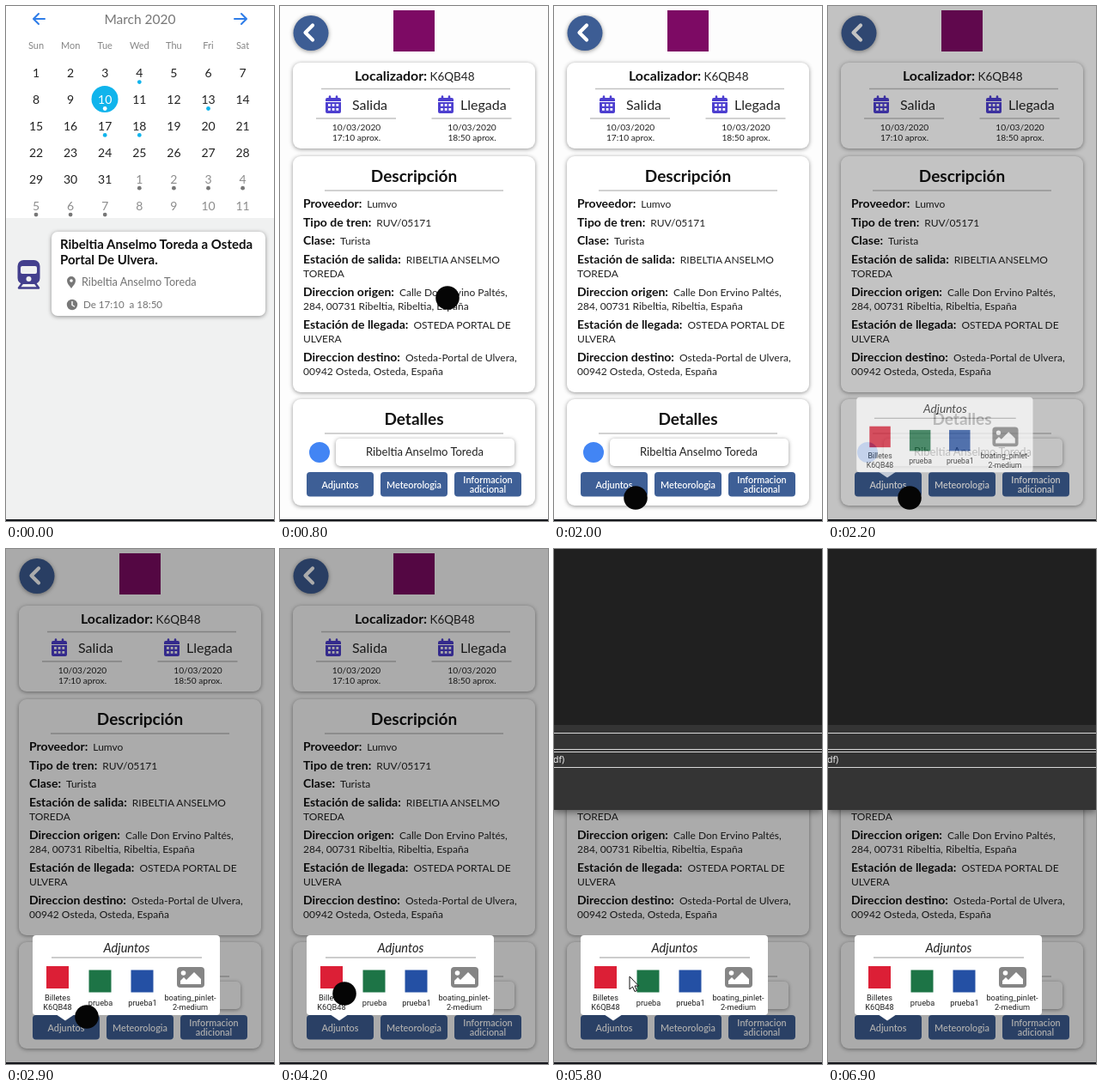
Recreate the animation shown at these times as an HTML page. Size 312 by 600 pixels, loop 7100 ms.

```html
<!DOCTYPE html>
<html lang="es">
<head>
<meta charset="utf-8">
<style>
  html, body { margin: 0; width: 100%; height: 100%; overflow: hidden; background: #fff; }
  svg { display: block; width: 312px; height: 600px; }
  text { font-family: Lato, sans-serif; fill: #222; white-space: pre; }
  .b { font-weight: 700; fill: #111; }
  .m { text-anchor: middle; }
  .small { font-family: Roboto, sans-serif; font-size: 9.2px; text-anchor: middle; }
  .card { fill: #fff; filter: drop-shadow(0 1px 2.5px rgba(0,0,0,.42)); }
  .rule { stroke: #c2c2c2; stroke-width: 1.5; }
  .line { fill: none; stroke-linecap: round; stroke-linejoin: round; }
</style>
</head>
<body>
<svg viewBox="0 0 312 600">
  <g id="agenda"></g>
  <g id="ticket"></g>
  <rect id="shade" width="312" height="600"/>
  <g id="popover"></g>
  <rect y="598" width="312" height="2" fill="#15171c"/>
  <g id="dialog">
    <rect width="312" height="304" fill="#343434" style="filter:drop-shadow(0 2px 4px rgba(0,0,0,.5))"/>
    <rect width="312" height="205" fill="#202020"/>
    <path d="M0 214.5H312M0 233.5H312M0 236.5H312M0 254.5H312" stroke="#d8d8d8"/>
    <text x="-1" y="249" style="font:10.5px 'Open Sans',sans-serif;fill:#fff">df)</text>
  </g>
  <circle id="dot" r="13.8" fill="#050505"/>
  <path id="arrow" d="M0 0V15L3.5 12L6 17.5L8.5 16.5L6 11H10.5Z" fill="#fff" stroke="#111"/>
</svg>
<script>
const $ = id => document.getElementById(id);
const text = (x, y, size, str, cls = '', style = '') =>
  `<text x="${x}" y="${y}" class="${cls}" style="font-size:${size}px;${style}">${str}</text>`;
const rect = (x, y, w, h, r, attrs) =>
  `<rect x="${x}" y="${y}" width="${w}" height="${h}" rx="${r}" ${attrs}/>`;
const circle = (x, y, r, fill) => `<circle cx="${x}" cy="${y}" r="${r}" fill="${fill}"/>`;
const card = (x, y, w, h, r) => rect(x, y, w, h, r, 'class="card"');
const rule = (x1, x2, y) => `<path d="M${x1} ${y}H${x2}" class="rule"/>`;
const line = (d, color, width) =>
  `<path d="${d}" class="line" stroke="${color}" stroke-width="${width}"/>`;

const station = 'Ribeltia Anselmo Toreda';
const code = 'K6QB48';

function agenda() {
  const columnX = i => 35 + 40.1 * i;
  let s = rect(0, 0, 312, 600, 0, 'fill="#f0f1f1"') + rect(0, 0, 312, 247, 0, 'fill="#fff"');
  s += line('M45 15H32.5M38 9L32 15L38 21', '#2f7de8', 2);
  s += line('M266 15H279.5M274 9L280 15L274 21', '#2f7de8', 2);
  s += text(156, 20.5, 15.5, 'March 2020', 'm', 'fill:#777');
  'Sun Mon Tue Wed Thu Fri Sat'.split(' ').forEach((d, i) => {
    s += text(columnX(i), 50, 11, d, 'm', 'fill:#858585');
  });
  s += circle(115, 108.5, 15.5, '#10b4ec');
  const events = [4, 10, 13, 17, 18];
  for (let n = 1; n <= 42; n++) {
    const x = columnX((n - 1) % 7), y = 83.3 + 30.9 * Math.floor((n - 1) / 7);
    const next = n > 31;
    const color = next ? '#8c8c8c' : n == 10 ? '#fff' : '#222';
    s += text(x, y, 14, next ? n - 31 : n, 'm', `fill:${color}`);
    if (events.includes(n) || next && n < 39)
      s += circle(x, y + 5.3, 2.4, next ? '#777' : n == 10 ? '#fff' : '#10b4ec');
  }
  s += card(53, 263, 249, 98, 7);
  s += text(63, 282.5, 15, station + ' a Osteda', 'b') + text(63, 300.5, 15, 'Portal De Ulvera.', 'b');
  s += '<path d="M76 329C73 325 71 323 71 320A5 5 0 0 1 81 320C81 323 79 325 76 329Z" fill="#777"/>' + circle(76, 320, 1.8, '#fff');
  s += text(88, 326, 12.7, station, '', 'fill:#737373');
  s += circle(77, 348, 6.2, '#777') + line('M77 344.5V348.5L79.5 350', '#fff', 1.4);
  s += text(90, 351.5, 11.6, 'De 17:10  a 18:50', '', 'fill:#737373');
  // train
  s += line('M19 323L15 328.5H38L34 323', '#433f8d', 2.5);
  s += rect(13.5, 296, 26, 28, 7, 'fill="#433f8d"') + rect(17, 303, 19, 9, 2, 'fill="#f0f1f1"');
  return s + circle(26.5, 318, 3, '#f0f1f1');
}

function calendarIcon(x) {
  let s = rect(x, 107, 18, 18, 2, 'fill="#4d3fd0"') + line(`M${x + 5} 105.5V109M${x + 13} 105.5V109`, '#4d3fd0', 2.6);
  s += `<path d="M${x} 111.5H${x + 18}" stroke="#fff"/>`;
  for (let i = 0; i < 6; i++)
    s += rect(x + 3 + i % 3 * 4.7, 114 + (i > 2) * 5, 2.8, 2.8, 0, 'fill="#fff"');
  return s;
}

function ticket() {
  let s = rect(0, 0, 312, 600, 0, 'fill="#fdfdfd"');
  s += '<circle cx="36" cy="31.5" r="20.5" class="card" style="fill:#3d5d94"/>' + line('M38 22.5L29.5 31L38 39.5', '#fff', 4.2);
  s += rect(132, 5, 48, 48, 0, 'fill="#7d0a64"');

  s += card(15, 66, 282, 100, 9);
  s += text(87, 86.5, 15.9, 'Localizador:', 'b') + text(174.5, 86.5, 13.5, code);
  s += rule(48, 268, 96.5);
  [[53, 84, 89, 'Salida', '17:10'], [184, 210, 223.5, 'Llegada', '18:50']].forEach(([icon, x, mid, name, time]) => {
    s += calendarIcon(icon) + text(x, 121, 16, name) + rule(mid - 47, mid + 46, 131);
    s += text(mid, 145, 10.2, '10/03/2020', 'm') + text(mid, 157, 10.2, time + ' aprox.', 'm');
  });

  s += card(15, 175, 282, 275, 9);
  s += text(156, 205, 19, 'Descripción', 'b m') + rule(52, 260, 215);
  [
    [235, 'Proveedor', 'Lumvo'],
    [256.5, 'Tipo de tren', 'RUV/05171'],
    [278, 'Clase', 'Turista'],
    [300, 'Estación de salida', 'RIBELTIA ANSELMO', 'TOREDA'],
    [337.5, 'Direccion origen', 'Calle Don Ervino Paltés,', '284, 00731 Ribeltia, Ribeltia, España'],
    [376, 'Estación de llegada', 'OSTEDA PORTAL DE', 'ULVERA'],
    [413.5, 'Direccion destino', 'Osteda-Portal de Ulvera,', '00942 Osteda, Osteda, España'],
  ].forEach(([y, label, value, more]) => {
    s += text(27, y, 12, `<tspan class="b" font-size="14">${label}:</tspan><tspan dx="6">${value}</tspan>`);
    if (more) s += text(27, y + 16.3, 12, more);
  });

  s += card(15, 458, 282, 124, 9);
  s += text(156, 488, 19, 'Detalles', 'b m') + rule(52, 260, 498);
  s += circle(46, 520, 12, '#4285f4');
  s += card(65, 504, 208, 32, 5) + text(168.5, 524, 13, station, 'm');
  [['Adjuntos'], ['Meteorologia'], ['Informacion', 'adicional']].forEach((words, i) => {
    const x = 31 + 86 * i;
    s += rect(x, 543, 78, 28.5, 4, 'fill="#3e5f96"');
    words.forEach((w, j) => {
      s += text(x + 39, (words[1] ? 556 : 561.5) + 10.5 * j, 10.8, w, 'm', 'fill:#fff;font-weight:600');
    });
  });
  return s;
}

function popover() {
  let s = '<path d="M58 542L69 549.5L80 542Z" fill="#fff"/>' + rect(31, 450, 218, 93, 4, 'fill="#fff"');
  s += text(140.5, 469.5, 14.6, 'Adjuntos', 'm', 'font-style:italic');
  s += '<path d="M53 476H228" stroke="#999"/>';
  [[60, 499, '#dc1f36'], [109.5, 503.5, '#1d7446'], [158.5, 503.5, '#2450a4']].forEach(([x, y, color]) => {
    s += rect(x - 13, y - 13, 26, 26, 0, `fill="${color}"`);
  });
  s += rect(199, 487, 32, 24, 4, 'fill="#858585"') + circle(206.5, 494, 2.8, '#fff');
  s += '<path d="M203 507V503L207 499L210 502L219 493L227 501V507Z" fill="#fff"/>';
  [[60, 526, 'Billetes'], [60, 537, code], [110, 532, 'prueba'], [159, 532, 'prueba1'],
   [214.5, 526, 'boating_pinlet-'], [214.5, 537, '2-medium']].forEach(([x, y, w]) => {
    s += `<text x="${x}" y="${y}" class="small">${w}</text>`;
  });
  return s;
}

Object.entries({ agenda, ticket, popover }).forEach(([id, draw]) => { $(id).innerHTML = draw(); });

const LOOP = 7100;
// time, x, y
const dotPath = [[100, 99, 187], [200, 258, 386], [300, 195, 340], [1250, 195, 340], [1950, 95, 573],
  [2600, 95, 573], [2900, 94, 545], [3500, 94, 545], [4100, 75, 518]];
const arrowPath = [[5200, 75, 514], [5500, 88, 498], [5900, 88, 498], [6400, 283, 230]];

const progress = (t, from, to) => Math.min(1, Math.max(0, (t - from) / (to - from)));
const ease = p => p * p * (3 - 2 * p);
const easeOut = p => 1 - (1 - p) ** 3;

function along(path, t) {
  let [, x, y] = path[0];
  for (let i = 1; i < path.length; i++) {
    const p = ease(progress(t, path[i - 1][0], path[i][0]));
    x += (path[i][1] - path[i - 1][1]) * p;
    y += (path[i][2] - path[i - 1][2]) * p;
  }
  return `translate(${x} ${y})`;
}

function set(id, opacity, transform = '') {
  $(id).style.display = opacity > 0 ? '' : 'none';
  $(id).setAttribute('opacity', opacity);
  $(id).setAttribute('transform', transform);
}

function frame(now) {
  const t = now % LOOP;
  const enter = easeOut(progress(t, 500, 780));
  const open = easeOut(progress(t, 2100, 2400));
  const scale = 0.8 + 0.2 * open;
  set('ticket', enter, `translate(0 ${40 * (1 - enter)})`);
  set('shade', 0.33 * open);
  set('popover', open, `translate(69 549) scale(${scale}) translate(-69 -549)`);
  set('dialog', +(t >= 5800));
  set('dot', +(t >= 100 && t < 5200), along(dotPath, t));
  set('arrow', +(t >= 5200 && t < 6500), along(arrowPath, t));
  requestAnimationFrame(frame);
}
requestAnimationFrame(frame);
</script>
</body>
</html>
```
